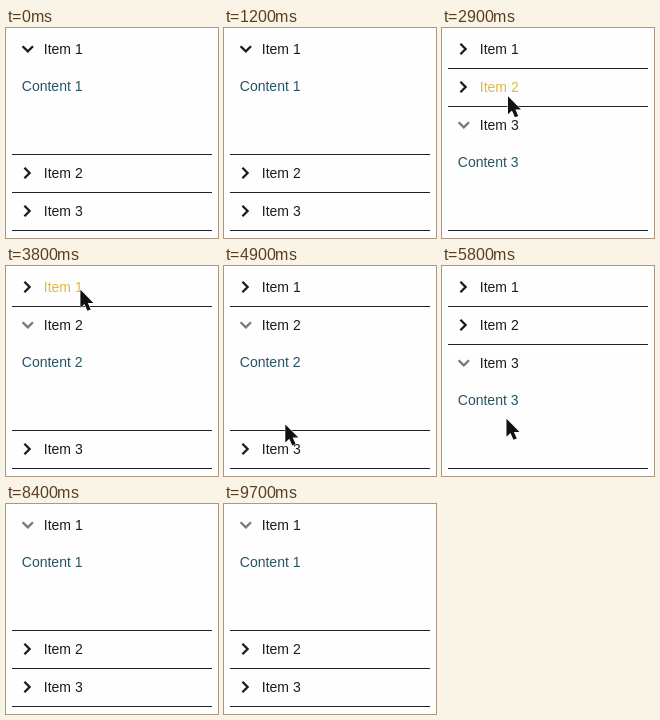
These frames come from a looping animation (212 by 210 pixels, 9.8 s). An HTML page:

```html
<!DOCTYPE html>
<html lang="en">
<head>
<meta charset="utf-8">
<title>Accordion</title>
<style>
  html, body { margin: 0; width: 100%; height: 100%; overflow: hidden; background: #fefefe; }
  svg { display: block; width: 212px; height: 210px; }
  text { font: 14px Arial, "Liberation Sans", sans-serif; fill: #1c1c1c; }
  .content { fill: #265464; }
  .hover { fill: #e4b840; }
  .chevron { fill: none; stroke: #1a1a1a; stroke-width: 2.3; }
  .rule { fill: #222; }
</style>
</head>
<body>
<svg id="stage" viewBox="0 0 212 210">
  <g id="items"></g>
  <path id="cursor" d="M0 0V18L4 14.3L7 21L10.3 19.7L7.4 13.2H13Z"
        fill="#111" stroke="#fff" stroke-width="1" paint-order="stroke"/>
</svg>
<script>
const LOOP = 9800, STEP = 100, REST = 100;
const HEAD = 38, PANEL = 86, TOP = 2;
const SVG = 'http://www.w3.org/2000/svg';

const enter = { time: 1100, x: 51, y: 214 };
const leave = { time: 7200, x: 98, y: 214 };
const clicks = [
  { time: 1800, item: 2, x: 53 },
  { time: 3200, item: 1, x: 67 },
  { time: 4000, item: 0, x: 75 },
  { time: 4600, item: 1, x: 62 },
  { time: 5300, item: 2, x: 60 },
  { time: 6950, item: 0, x: 84 }
];

const headTop = (item, open) => TOP + item * HEAD + (item > open ? PANEL : 0);
const openAt = t => clicks.reduce((open, c) => c.time <= t ? c.item : open, 0);
const mix = (a, b, k) => a + (b - a) * k;

// Each click lands in the middle of the header where it stands just before.
for (const c of clicks) c.y = headTop(c.item, openAt(c.time - 1)) + HEAD / 2;
const stops = [enter, ...clicks, leave];

function make(tag, parent, attrs = {}, label = '') {
  const el = document.createElementNS(SVG, tag);
  for (const key in attrs) el.setAttribute(key, attrs[key]);
  el.textContent = label;
  return parent.appendChild(el);
}

const items = [1, 2, 3].map(n => {
  const group = make('g', document.getElementById('items'));
  return {
    group,
    chevron: make('path', group, { class: 'chevron' }),
    title: make('text', group, { x: 37.8, y: 24 }, 'Item ' + n),
    content: make('text', group, { x: 15.8, y: 61, class: 'content' }, 'Content ' + n),
    rule: make('rect', group, { x: 6, width: 200, height: 1, class: 'rule' })
  };
});
const cursor = document.getElementById('cursor');

// The pointer glides between stops, resting a moment around each click.
function pointerAt(t) {
  const i = stops.findIndex(s => s.time > t);
  if (i < 1) return null;
  const from = stops[i - 1], to = stops[i];
  const begin = from.time + REST, end = to.time - (to === leave ? 0 : REST);
  const k = Math.min(1, Math.max(0, (t - begin) / (end - begin)));
  const ease = k * k * (3 - 2 * k);
  return { x: mix(from.x, to.x, ease), y: mix(from.y, to.y, ease) };
}

function draw(t) {
  const open = openAt(t), point = pointerAt(t);

  items.forEach((item, i) => {
    const isOpen = i === open, y = headTop(i, open);
    const hover = !isOpen && point && point.y >= y && point.y < y + HEAD;
    item.group.setAttribute('transform', `translate(0 ${y})`);
    item.chevron.setAttribute('d', isOpen
      ? 'M16.6 16.2L21.8 21.4L27 16.2' : 'M18.4 13.8L23.6 19L18.4 24.2');
    // The open item is dimmed once the list has been used.
    item.chevron.style.stroke = isOpen && t >= clicks[0].time ? '#777' : '#1a1a1a';
    item.title.setAttribute('class', hover ? 'hover' : '');
    item.content.style.display = isOpen ? '' : 'none';
    item.rule.setAttribute('y', HEAD + (isOpen ? PANEL : 0));
  });

  cursor.style.display = point ? '' : 'none';
  if (point) cursor.setAttribute('transform', `translate(${point.x} ${point.y})`);
}

const start = performance.now();
function tick() {
  const t = (performance.now() - start) % LOOP;
  draw(Math.floor(t / STEP) * STEP);
  requestAnimationFrame(tick);
}
tick();
</script>
</body>
</html>
```
